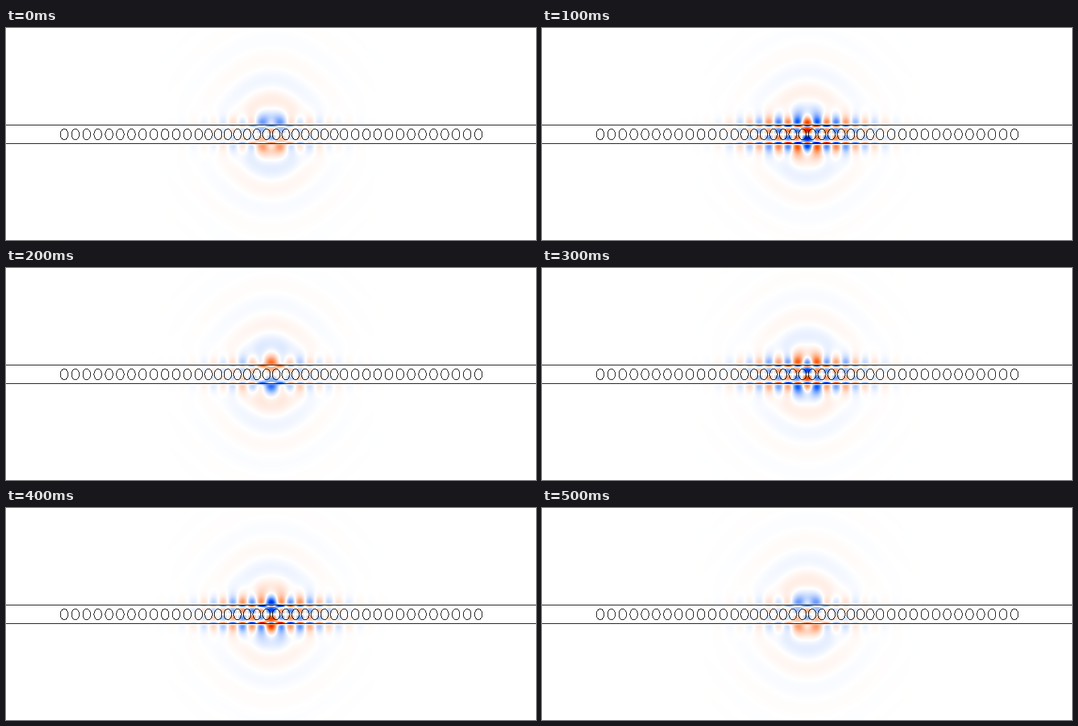
An HTML page with a canvas for the animation above (0.6 s loop, 800x320 px).

```html
<!DOCTYPE html>
<html lang="en">
<head>
<meta charset="utf-8">
<title>Nanobeam cavity field</title>
<style>
  html, body { margin: 0; width: 100%; height: 100%; overflow: hidden; background: #fff; }
  canvas { display: block; }
</style>
</head>
<body>
<canvas id="stage" width="800" height="320"></canvas>
<script>
const W = 800, H = 320, CX = 400, CY = 160;
const FRAME = 100, FRAMES = 6, PERIOD = 5;
const ctx = document.getElementById('stage').getContext('2d');
const { PI, abs, exp, cos, sin, hypot, min, max } = Math;

// Lattice index at distance d from the centre: the spacing widens in the mirrors
const cell = d => min(d / 14.6, (d + 17) / 16.9);
const holeAt = u => max(14.6 * u, 16.9 * u - 17);
const bell = (d, width) => exp(-((d / width) ** 2));

function inHole(x, y) {
  const d = abs(x - CX);
  const u = min(Math.floor(cell(d)) + 0.5, 19.5);
  return ((d - holeAt(u)) / 6.2) ** 2 + ((y - CY) / 8.6) ** 2 <= 1;
}

function isOutline(x, y) {
  if (abs(y - CY) === 14) return true;
  return inHole(x, y) &&
    !(inHole(x - 1, y) && inHole(x + 1, y) && inHole(x, y - 1) && inHole(x, y + 1));
}

// Mode strength across the beam: core, thin edge strip, evanescent tail
function profile(d) {
  if (d < 11) return 0.8 * sin(PI * d / 11);
  if (d < 15) return -1.4 * sin(PI * (d - 11) / 4);
  const t = d - 15;
  return 2.4 * (1 - exp(-t / 4)) * exp(-t / 6);
}

function field(x, y, n) {
  const dx = abs(x - CX), dy = abs(y - CY);
  const cavity = cos(2 * PI * n / PERIOD - 1.29) * cos(PI * cell(dx)) *
    profile(dy) * bell(dx, 80);

  // Outgoing wave with slightly flattened fronts
  const r = hypot(dx, dy) || 1;
  const front = r * (1 + 0.05 * (2 * dx * dy / (r * r)) ** 2);
  const wave = cos(2 * PI * ((front - 55) / 60 - n / PERIOD)) *
    (0.28 * exp(-r / 45) + 0.7 * bell(r, 22)) * dy / hypot(dx, dy, 12);

  return Math.sign(CY - y) * (cavity + wave);
}

function color(v) {
  const a = abs(v);
  const main = 255 - 130 * min(max(a - 0.9, 0), 1);
  const mid = 255 * max(0, 1 - 0.8 * a);
  const low = 255 * max(0, 1 - 1.2 * a);
  return v > 0 ? [main, mid, low] : [low, mid, main];
}

function render(n) {
  const img = ctx.createImageData(W, H);
  for (let y = 0, i = 0; y < H; y++) {
    for (let x = 0; x < W; x++, i += 4) {
      const rgb = isOutline(x, y) ? [0, 0, 0] : color(field(x, y, n));
      img.data.set(rgb, i);
      img.data[i + 3] = 255;
    }
  }
  return img;
}

const phases = Array.from({ length: PERIOD }, (_, n) => render(n));
const start = performance.now();
let shown = -1;

function draw(now) {
  const n = Math.floor(max(0, now - start) / FRAME) % FRAMES % PERIOD;
  if (n !== shown) ctx.putImageData(phases[n], 0, 0);
  shown = n;
  requestAnimationFrame(draw);
}
draw(start);
</script>
</body>
</html>
```
